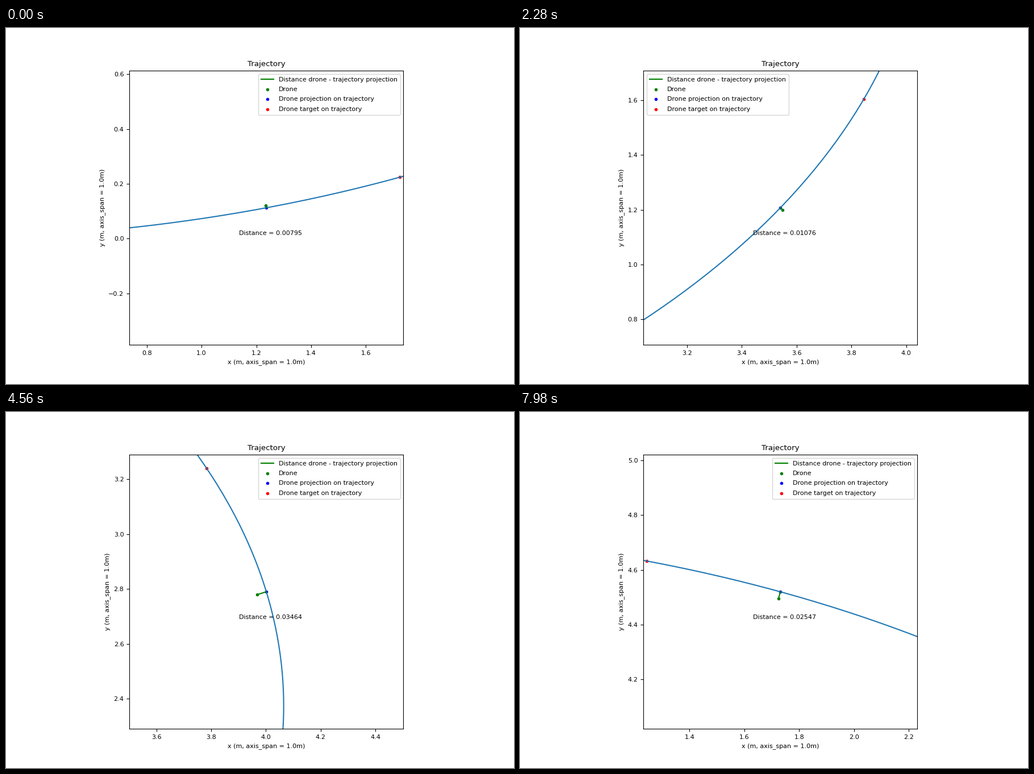
A matplotlib script that plays this animation: 894 px wide and 626 px high, repeating every 8000 ms.

```python
import numpy as np
import matplotlib.pyplot as plt
from matplotlib.animation import FuncAnimation

WIDTH, HEIGHT, DPI = 894, 626, 100
LOOP, INTERVAL, STEP = 8000, 40, 60   # ms; the picture changes every STEP
A, B = 4.065, 2.373                   # half axes of the elliptic trajectory
LOOK_AHEAD = 0.5

# Key poses: time (s), angle on the ellipse, offset to the left of the path (m)
KEYS = np.array([
    (0.00, 0.3091, 0.00795),
    (1.62, 0.8360, -0.00731),
    (3.00, 1.2933, -0.008433),
    (4.56, 1.7474, 0.03464),
    (5.88, 2.1020, 0.06781),
    (7.02, 2.4178, 0.05392),
    (7.98, 2.7016, 0.02547),
])
SLOPES = np.gradient(KEYS, KEYS[:, 0], axis=0, edge_order=2)


def pose(t):
    """Angle and offset at time t, eased smoothly between the key poses."""
    i = min(np.searchsorted(KEYS[:, 0], t, side="right"), len(KEYS) - 1) - 1
    h = KEYS[i + 1, 0] - KEYS[i, 0]
    u = (t - KEYS[i, 0]) / h
    value = ((1 + 2 * u) * (1 - u) ** 2 * KEYS[i]
             + u * (1 - u) ** 2 * h * SLOPES[i]
             + u * u * (3 - 2 * u) * KEYS[i + 1]
             + u * u * (u - 1) * h * SLOPES[i + 1])
    return value[1:]


def track(angle):
    return np.array([A * np.sin(angle), B * (1 - np.cos(angle))])


def left_normal(angle):
    tx, ty = A * np.cos(angle), B * np.sin(angle)
    return np.array([-ty, tx]) / np.hypot(tx, ty)


def target_ahead(angle):
    """Point further along that lies LOOK_AHEAD away in a straight line."""
    ahead = angle + np.linspace(0, 0.4, 200)
    gap = np.hypot(*(track(ahead) - track(angle)[:, None]))
    return track(np.interp(LOOK_AHEAD, gap, ahead))


plt.rcParams["font.size"] = 8
fig, ax = plt.subplots(figsize=(WIDTH / DPI, HEIGHT / DPI), dpi=DPI)
ax.set_aspect("equal", adjustable="box")
ax.set_title("Trajectory")
ax.set_xlabel("x (m, axis_span = 1.0m)")
ax.set_ylabel("y (m, axis_span = 1.0m)")

ax.plot(*track(np.linspace(0, 2 * np.pi, 800)), color="C0")
link, = ax.plot([], [], color="green",
                label="Distance drone - trajectory projection")


def dot(color, label):
    return ax.scatter([0], [0], marker=".", color=color, label=label)


drone_dot = dot("green", "Drone")
proj_dot = dot("blue", "Drone projection on trajectory")
target_dot = dot("red", "Drone target on trajectory")
caption = ax.text(0, 0, "")
ax.legend(loc="best", labelspacing=0.66, borderpad=0.45)


def update(frame):
    t = (frame * INTERVAL + INTERVAL // 2) // STEP * STEP / 1000
    angle, offset = pose(t)
    proj = track(angle)
    drone = proj + offset * left_normal(angle)

    ax.set_xlim(proj[0] - 0.5, proj[0] + 0.5)
    ax.set_ylim(proj[1] - 0.5, proj[1] + 0.5)
    link.set_data(*np.transpose([drone, proj]))
    drone_dot.set_offsets([drone])
    proj_dot.set_offsets([proj])
    target_dot.set_offsets([target_ahead(angle)])
    caption.set_position(proj - 0.1)
    caption.set_text(f"Distance = {abs(offset):.4g}")
    return link, drone_dot, proj_dot, target_dot, caption


anim = FuncAnimation(fig, update, frames=LOOP // INTERVAL, interval=INTERVAL,
                     init_func=lambda: update(0), repeat=True, repeat_delay=0)
plt.show()
```
